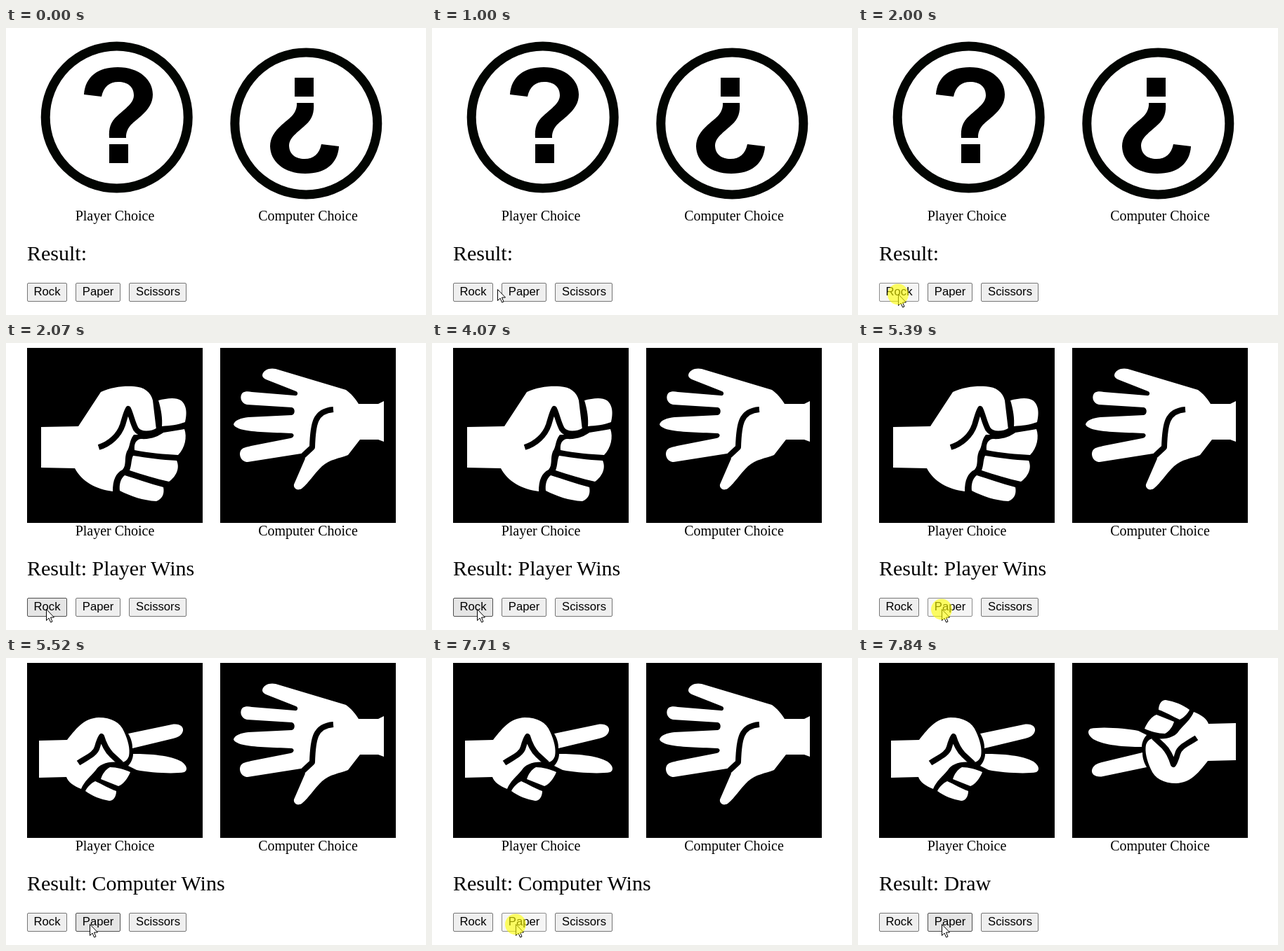
An HTML page that plays this animation: 598 px wide and 410 px high, repeating every 8 s.

```html
<!DOCTYPE html>
<html lang="en">
<head>
<meta charset="utf-8">
<title>Rock Paper Scissors</title>
<style>
  html, body { margin: 0; width: 100%; height: 100%; overflow: hidden; background: #fff; }
  svg { display: block; width: 598px; height: 410px; }

  .label { font: 20px "Liberation Serif", "Times New Roman", serif; text-anchor: middle; }
  .result { font: 30px "Liberation Serif", "Times New Roman", serif; }
  .button text { font: 16.667px "Liberation Sans", Arial, sans-serif; text-anchor: middle; }
  .button rect { fill: #efefef; stroke: #767676; }
  .hand { fill: #fff; }
  .crease { fill: none; stroke: #000; stroke-width: 8; stroke-linejoin: round; }

  /* Every change is a hard cut on one shared 8 s clock. */
  .intro, .round1, .round2, .round3, .fist, .palm, .snip, #cursor, #glow, #rock rect, #paper rect {
    animation: 8s step-end infinite;
  }
  .intro { animation-name: intro; }
  .round1, .fist { animation-name: round1; }
  .round2 { animation-name: round2; }
  .round3 { animation-name: round3; }
  .palm { animation-name: palm; }
  .snip { animation-name: snip; }
  #cursor { animation-name: move; }
  #glow { animation-name: click; }
  #rock rect { animation-name: rock; }
  #paper rect { animation-name: paper; }

  @keyframes intro  { 0% { opacity: 1 } 25.875%, 100% { opacity: 0 } }
  @keyframes round1 { 0% { opacity: 0 } 25.875% { opacity: 1 } 69%, 100% { opacity: 0 } }
  @keyframes round2 { 0% { opacity: 0 } 69% { opacity: 1 } 98%, 100% { opacity: 0 } }
  @keyframes round3 { 0% { opacity: 0 } 98%, 100% { opacity: 1 } }
  @keyframes palm   { 0% { opacity: 0 } 25.875% { opacity: 1 } 98%, 100% { opacity: 0 } }
  @keyframes snip   { 0% { opacity: 0 } 69%, 100% { opacity: 1 } }

  @keyframes click {
    0% { opacity: 0 }
    25% { opacity: .6 } 25.875% { opacity: 0 }
    67.375% { opacity: .6 } 69% { opacity: 0 }
    96.375% { opacity: .6 } 98%, 100% { opacity: 0 }
  }
  @keyframes move {
    0% { transform: translate(620px, 355px) }
    8.25% { transform: translate(419px, 355px) }
    9.09% { transform: translate(345px, 355px) }
    9.93% { transform: translate(273px, 355px) }
    10.76% { transform: translate(207px, 357px) }
    11.6% { transform: translate(145px, 364px) }
    12.44% { transform: translate(94px, 374px) }
    13.28% { transform: translate(64px, 383px) }
    14.125% { transform: translate(54px, 386px) }
    17.5% { transform: translate(55px, 385px) }
    18.31% { transform: translate(57px, 383px) }
    19.125% { transform: translate(58px, 381px) }
    50.875% { transform: translate(65px, 381px) }
    52.5% { transform: translate(71px, 381px) }
    53.31% { transform: translate(84px, 381px) }
    54.125% { transform: translate(101px, 381px) }
    54.94% { transform: translate(114px, 381px) }
    55.75%, 100% { transform: translate(120px, 381px) }
  }
  @keyframes rock {
    0% { fill: #efefef; stroke: #767676 }
    13.28% { fill: #e5e5e5; stroke: #4f4f4f }
    25% { fill: #f5f5f5; stroke: #8d8d8d }
    25.875% { fill: #e5e5e5; stroke: #4f4f4f }
    54.125%, 100% { fill: #efefef; stroke: #767676 }
  }
  @keyframes paper {
    0% { fill: #efefef; stroke: #767676 }
    11.6% { fill: #e5e5e5; stroke: #4f4f4f }
    12.44% { fill: #efefef; stroke: #767676 }
    54.125% { fill: #e5e5e5; stroke: #4f4f4f }
    67.375% { fill: #f5f5f5; stroke: #8d8d8d }
    69% { fill: #e5e5e5; stroke: #4f4f4f }
    96.375% { fill: #f5f5f5; stroke: #8d8d8d }
    98%, 100% { fill: #e5e5e5; stroke: #4f4f4f }
  }
</style>
</head>
<body>
<svg viewBox="0 0 598 410">
  <defs>
    <g id="unknown">
      <circle cx="157.7" cy="127.5" r="101.5" fill="none" stroke="#020502" stroke-width="13"/>
      <path d="M111 95C113 70 130 56 159 56C190 56 209 74 209 95C209 107 203 116 192 126C179 137 171 142 171 157H147C146 143 149 134 158 126C171 114 182 107 182 96C182 84 173 77 160 77C147 77 139 84 136 98Z"/>
      <path d="M147 166H174V193H147Z"/>
    </g>
    <g id="scissors">
      <rect x="30" y="7" width="250" height="250"/>
      <g class="hand">
        <path d="M47 118L87 117C102 98 112 86 132 85C150 85 163 92 168 105C174 118 177 130 175 140C172 148 168 149 162 149C145 147 133 152 128 160C120 170 112 175 107 187C97 183 88 177 86 170L47 171Z"/>
        <path d="M174 108L236 95C247 93 253 98 252 104C250 111 245 113 238 115L180 129C180 121 178 115 174 108Z"/>
        <path d="M181 137C205 137 235 139 250 148C258 154 259 160 254 163C240 166 205 164 186 160L174 154C178 150 181 143 181 137Z"/>
        <path d="M148 156C158 156 168 159 177 163C173 173 166 181 160 183L135 173C137 166 142 159 148 156Z"/>
        <path d="M127 176C137 180 147 187 157 190C157 198 153 204 147 204C135 202 122 197 113 190C116 184 121 179 127 176Z"/>
      </g>
      <path class="crease" d="M103 150C115 142 128 137 130 127C132 120 134 115 136 112C139 122 143 131 150 138L164 151"/>
    </g>
  </defs>

  <g class="intro">
    <use href="#unknown"/>
    <use href="#unknown" transform="rotate(180 292.5 132)"/>
    <text class="result" x="30" y="332">Result:</text>
  </g>

  <g class="fist">
    <rect x="30" y="7" width="250" height="250"/>
    <g class="hand">
      <path d="M50 120L103 119L135 70C150 63 167 61 182 62C197 63 206 70 209 82L214 124C205 130 193 131 182 131C175 140 177 148 172 155C168 165 172 174 166 181C156 186 152 196 152 212C128 209 108 198 98 179L50 178Z"/>
      <path d="M217 82C228 79 242 77 249 82C259 90 257 104 255 113C245 117 233 118 222 119C223 108 221 95 217 82Z"/>
      <path d="M183 153C182 144 185 138 192 137C207 138 217 133 224 128C234 126 245 125 254 123C258 134 255 150 245 160C226 159 204 157 183 153Z"/>
      <path d="M181 161C200 164 222 167 243 168C248 179 242 191 232 198C214 194 194 188 176 182C179 174 178 167 181 161Z"/>
      <path d="M169 189C185 194 205 201 224 206C226 216 222 223 214 226C195 225 178 219 162 211C161 202 163 194 169 189Z"/>
    </g>
    <path class="crease" d="M132 149C148 144 161 132 166 117C169 107 171 99 174 94C178 102 180 114 185 123C191 132 207 131 218 124"/>
  </g>

  <g class="palm">
    <rect x="305" y="7" width="250" height="250"/>
    <path class="hand" d="M365 46C366 38 376 35 384 37L484 67C492 73 497 79 502 87H530L538 83V141L530 138H504L487 160C475 165 461 166 450 176C440 185 431 200 421 208C414 212 409 207 410 202L426 165L420 158L344 170C335 170 331 160 334 154C337 149 342 149 349 147L405 136C411 135 411 129 406 129C380 128 350 127 338 124C328 122 324 118 324 116C326 110 335 107 345 106L407 103C412 102 412 93 407 92L343 88C334 86 332 76 337 71C340 69 345 69 350 70L411 75C415 76 417 71 413 69L370 52C366 50 365 48 365 46Z"/>
    <path class="crease" d="M466 95C440 97 437 115 436 149L421 163"/>
  </g>

  <use class="snip" href="#scissors"/>
  <g class="round3"><use href="#scissors" transform="rotate(180 292.5 132)"/></g>

  <text class="label" x="155" y="275">Player Choice</text>
  <text class="label" x="430" y="275">Computer Choice</text>
  <text class="result round1" x="30" y="332">Result: Player Wins</text>
  <text class="result round2" x="30" y="332">Result: Computer Wins</text>
  <text class="result round3" x="30" y="332">Result: Draw</text>

  <g class="button" id="rock">
    <rect x="30.5" y="364.5" width="56" height="26" rx="1.5"/>
    <text x="58.5" y="382">Rock</text>
  </g>
  <g class="button" id="paper">
    <rect x="99.5" y="364.5" width="63" height="26" rx="1.5"/>
    <text x="131" y="382">Paper</text>
  </g>
  <g class="button">
    <rect x="175.5" y="364.5" width="81" height="26" rx="1.5"/>
    <text x="216.5" y="382">Scissors</text>
  </g>

  <g id="cursor">
    <path d="M-.5 -.5V15.5L3 12L5.6 18L8 17L5.5 11H10.5Z" fill="#fff" stroke="#000"/>
    <circle id="glow" cx="-1" cy="-.5" r="15" fill="#ff0"/>
  </g>
</svg>
</body>
</html>
```
